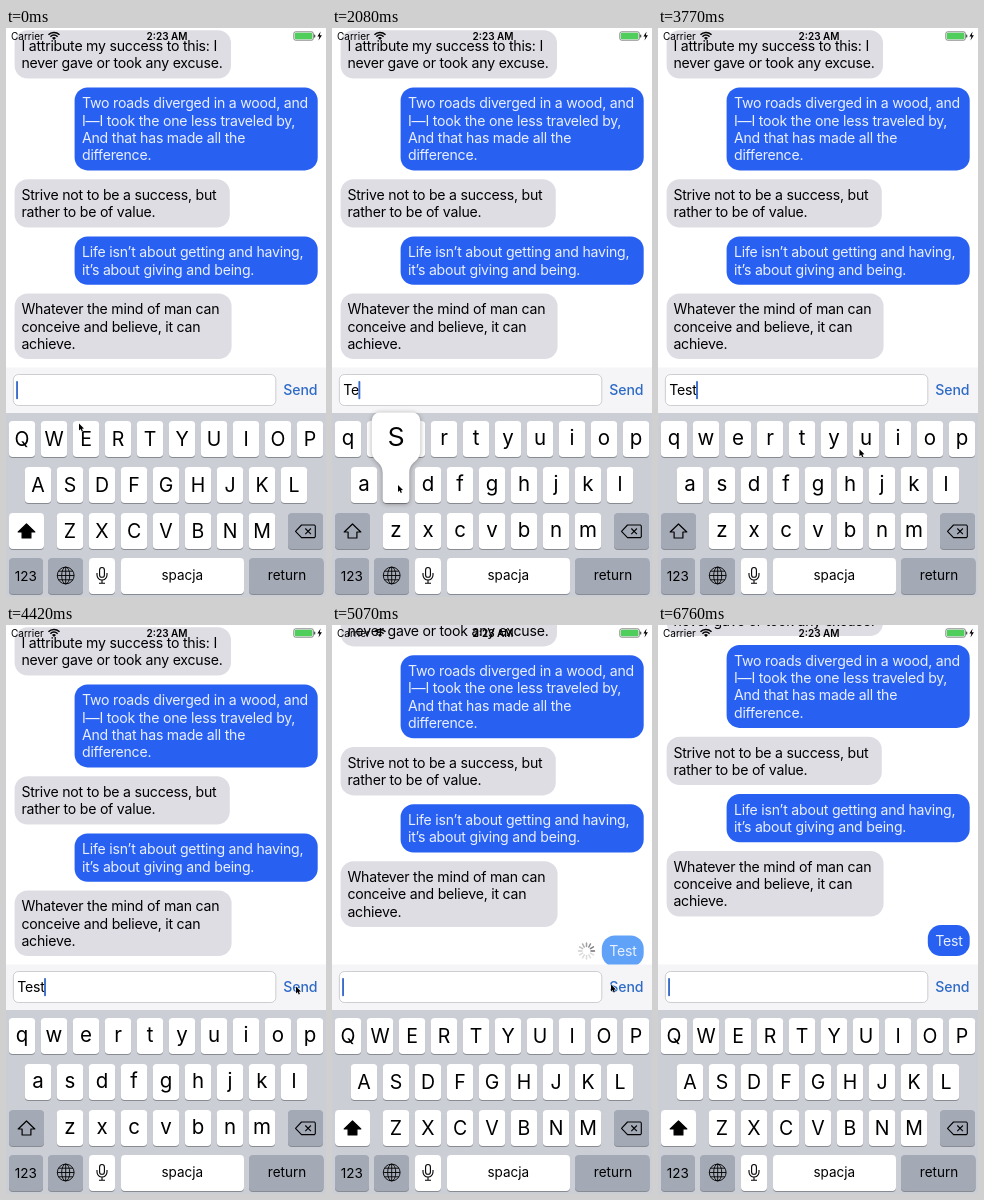
These frames come from a looping animation (320 px wide and 569 px high, 6.89 s). An HTML page with a canvas:

```html
<!DOCTYPE html>
<html lang="en">
<head>
<meta charset="utf-8">
<title>Chat</title>
<style>
html, body { margin: 0; width: 100%; height: 100%; overflow: hidden; background: #fff; }
canvas { display: block; width: 100vw; height: 100vh; }
</style>
</head>
<body>
<canvas id="stage"></canvas>
<script>
const W = 320, H = 569, LOOP = 6890, STEP = 130;
const FONT = 'Inter, "Liberation Sans", Arial, sans-serif';
const GREY = '#dfdde4', BLUE = '#2860f2', PENDING = '#60a2f8', KEY_GREY = '#a3aab6';
const SEND = 4847, SENT = 6630, LIFT = 39.5, LINE = 17.35;

const messages = [
  { y: 2.2, x: 8.6, w: 216.4, lines: ['I attribute my success to this: I', 'never gave or took any excuse.'] },
  { y: 59.4, x: 68.6, w: 243.1, mine: true, lines: ['Two roads diverged in a wood, and', 'I\u2014I took the one less traveled by,', 'And that has made all the', 'difference.'] },
  { y: 151.2, x: 8.6, w: 215.2, lines: ['Strive not to be a success, but', 'rather to be of value.'] },
  { y: 208.4, x: 68.6, w: 243.1, mine: true, lines: ['Life isn\u2019t about getting and having,', 'it\u2019s about giving and being.'] },
  { y: 265.4, x: 8.6, w: 217, lines: ['Whatever the mind of man can', 'conceive and believe, it can', 'achieve.'] }
];

const rows = [
  { keys: 'QWERTYUIOP', x: 16, y: 393 },
  { keys: 'ASDFGHJKL', x: 32, y: 439 },
  { keys: 'ZXCVBNM', x: 64, y: 485 }
];

// Key presses: letter, down time, up time
const presses = [['T', 1040, 1300], ['e', 1690, 1950], ['s', 2080, 2340], ['t', 2470, 2600]];

// Pointer stops: time, x, y
const stops = [
  [0, 73, 395.5], [260, 73, 395.5], [1040, 146, 411.5], [1300, 146, 411.5],
  [1690, 82, 411], [1820, 82, 411], [2080, 66, 457], [2210, 66, 457],
  [2470, 146, 411], [2600, 146, 411], [2860, 144, 459.5], [3250, 144, 460],
  [3380, 144, 460], [4290, 290, 361.5], [4810, 290, 361.5], [5070, 279, 359.5],
  [5590, 328, 580], [LOOP, 328, 580]
];

const canvas = document.getElementById('stage');
const c = canvas.getContext('2d');

const smooth = p => p * p * (3 - 2 * p);
const clamp = p => Math.max(0, Math.min(1, p));
const easeInOut = p => p < 0.5 ? 2 * p * p : 1 - 2 * (1 - p) * (1 - p);

function box(x, y, w, h, r, fill, stroke) {
  c.beginPath();
  c.roundRect(x, y, w, h, r);
  if (fill) { c.fillStyle = fill; c.fill(); }
  if (stroke) { c.strokeStyle = stroke; c.stroke(); }
}

function text(str, x, y, size, color = '#000', { align = 'left', weight = 400, gap = 0 } = {}) {
  c.font = `${weight} ${size}px ${FONT}`;
  c.letterSpacing = gap + 'px';
  c.textAlign = align;
  c.fillStyle = color;
  c.fillText(str, x, y);
}

function path(points, close) {
  c.beginPath();
  points.forEach(([x, y]) => c.lineTo(x, y));
  if (close) c.closePath();
}

function bubble({ x, y, w, lines, mine }, fill) {
  box(x, y, w, 13.6 + lines.length * LINE, 13, fill);
  lines.forEach((line, i) => text(line, x + (mine ? 7.4 : 6.8), y + 20.8 + i * LINE, 14.1, mine ? '#e8efff' : '#000', { gap: -0.22 }));
}

function spinner(x, y, t) {
  const head = Math.floor(t * 12 / 1000);
  c.lineWidth = 1.5;
  c.lineCap = 'round';
  for (let i = 0; i < 12; i++) {
    const a = i * Math.PI / 6;
    const age = ((head - i) % 12 + 12) % 12;
    c.strokeStyle = `rgba(110,110,115,${Math.max(0.25, 1 - age * 0.11)})`;
    path([[x + 4.5 * Math.cos(a), y + 4.5 * Math.sin(a)], [x + 8 * Math.cos(a), y + 8 * Math.sin(a)]]);
    c.stroke();
  }
  c.lineCap = 'butt';
}

function drawChat(t) {
  const lift = LIFT * easeInOut(clamp((t - SEND) / 350));
  c.save();
  c.translate(0, -lift);
  messages.forEach(m => bubble(m, m.mine ? BLUE : GREY));
  if (t >= SEND) {
    bubble({ x: 269.8, y: 339.6, w: 41.9, lines: ['Test'], mine: true }, t < SENT ? PENDING : BLUE);
    if (t < SENT) spinner(254.5, 355, t);
  }
  c.restore();
}

function drawStatus() {
  text('Carrier', 5, 12, 10);
  text('2:23 AM', 161, 12, 10, '#000', { align: 'center', weight: 600 });
  c.strokeStyle = '#000';
  c.lineWidth = 1.5;
  [7.6, 4.9].forEach(r => {
    c.beginPath();
    c.arc(48, 12, r, -Math.PI * 0.76, -Math.PI * 0.24);
    c.stroke();
  });
  c.fillStyle = '#000';
  c.beginPath();
  c.moveTo(48, 12);
  c.arc(48, 12, 2.8, -Math.PI * 0.76, -Math.PI * 0.24);
  c.fill();
  c.lineWidth = 0.7;
  box(287.8, 3.8, 19.6, 8.4, 1.8, null, '#555');
  box(288.8, 4.8, 17.6, 6.4, 1, '#4fce5c');
  box(308, 6.5, 1.3, 3, 0.6, '#555');
  path([[314.6, 3.6], [311.4, 8.6], [313.4, 8.6], [312.5, 12.4], [315.9, 7.2], [313.8, 7.2]], true);
  c.fillStyle = '#000';
  c.fill();
}

function caretOn(t) {
  const start = t < 1300 ? -100 : t < 2600 ? t : t < SEND ? 2400 : 4670;
  return (t - start) % 1000 < 500;
}

function drawInput(t) {
  c.fillStyle = '#f5f5f7';
  c.fillRect(0, 339.5, W, 45.5);
  c.lineWidth = 0.8;
  box(7.4, 346.5, 262.4, 31, 5, '#fff', '#c3c3c8');
  const typed = t < SEND ? presses.filter(p => t >= p[2]).map(p => p[0]).join('') : '';
  text(typed, 11.3, 367, 14.1, '#000', { gap: -0.2 });
  const caretX = typed ? 10.6 + c.measureText(typed).width : 10.1;
  if (caretOn(t)) box(caretX, 353, 1.9, 18.2, 0.8, '#3b6ccc');
  c.globalAlpha = t >= 4680 && t < SEND ? 0.3 : 1;
  text('Send', 277.3, 367, 14.1, '#2f6bc6', { weight: 500, gap: -0.1 });
  c.globalAlpha = 1;
}

function key(x, y, w, fill = '#fff') {
  box(x, y + 1, w, 36, 4, '#888b91');
  box(x, y, w, 36, 4, fill);
}

function drawShift(upper) {
  key(3, 485, 35, upper ? '#fff' : KEY_GREY);
  path([[20.5, 496], [28.8, 504], [24.9, 504], [24.9, 510], [16.1, 510], [16.1, 504], [12.2, 504]], true);
  c.lineWidth = 1.2;
  c.lineJoin = 'round';
  c.strokeStyle = c.fillStyle = '#000';
  if (upper) c.fill();
  c.stroke();
}

function drawBackspace() {
  key(282, 485, 35, KEY_GREY);
  c.lineWidth = 1.1;
  c.strokeStyle = '#000';
  path([[289.5, 503.3], [295.5, 497], [308.5, 497], [309.3, 498], [309.3, 508.7], [308.5, 509.6], [295.5, 509.6]], true);
  c.stroke();
  [-1, 1].forEach(s => {
    path([[299.3, 503.3 - s * 2.8], [304.9, 503.3 + s * 2.8]]);
    c.stroke();
  });
}

function drawGlobe() {
  key(42, 530, 35, KEY_GREY);
  c.lineWidth = 0.9;
  c.strokeStyle = '#000';
  const x = 59.7, y = 547.5, r = 8.4;
  [r, r * 0.48].forEach(rx => {
    c.beginPath();
    c.ellipse(x, y, rx, r, 0, 0, 7);
    c.stroke();
  });
  [[0, r], [-4.3, 7.2], [4.3, 7.2]].forEach(([dy, half]) => {
    path([[x - half, y + dy], [x + half, y + dy]]);
    c.stroke();
  });
  path([[x, y - r], [x, y + r]]);
  c.stroke();
}

function drawMic() {
  key(83, 530, 26, '#fff');
  c.lineWidth = 1.1;
  box(93.6, 539.5, 4.8, 9.8, 2.4, null, '#000');
  c.beginPath();
  c.moveTo(91, 545);
  c.lineTo(91, 547);
  c.arc(96, 547, 5, Math.PI, 0, true);
  c.lineTo(101, 545);
  c.moveTo(96, 552);
  c.lineTo(96, 555);
  c.moveTo(93, 555.2);
  c.lineTo(99, 555.2);
  c.stroke();
}

function drawPopup(letter) {
  const row = rows.find(r => r.keys.includes(letter.toUpperCase()));
  const x = row.x + 32 * row.keys.indexOf(letter.toUpperCase());
  const y = row.y, wide = 24.2, half = 13.3;
  const top = y - 54.5, shoulder = y - 16, neck = y + 6;
  const upper = letter !== letter.toLowerCase();
  c.save();
  c.shadowColor = 'rgba(0,0,0,0.35)';
  c.shadowBlur = 5;
  c.shadowOffsetY = 0.8;
  c.fillStyle = '#fff';
  c.beginPath();
  c.moveTo(x, top);
  c.arcTo(x + wide, top, x + wide, shoulder, 8);
  c.lineTo(x + wide, shoulder);
  c.bezierCurveTo(x + wide, y - 5, x + half, y - 6, x + half, neck);
  c.arcTo(x + half, y + 36, x, y + 36, 4);
  c.arcTo(x - half, y + 36, x - half, neck, 4);
  c.lineTo(x - half, neck);
  c.bezierCurveTo(x - half, y - 6, x - wide, y - 5, x - wide, shoulder);
  c.arcTo(x - wide, top, x, top, 8);
  c.closePath();
  c.fill();
  c.restore();
  text(letter, x, y - (upper ? 19 : 21), upper ? 34 : 35, '#000', { align: 'center', weight: 300 });
}

function drawKeyboard(t) {
  const upper = t < 1300 || t >= SEND;
  const center = { align: 'center' };
  c.fillStyle = '#ccced5';
  c.fillRect(0, 385, W, H - 385);
  rows.forEach(row => [...row.keys].forEach((k, i) => {
    const x = row.x + 32 * i;
    key(x - 13.2, row.y, 26.4);
    text(upper ? k : k.toLowerCase(), x, row.y + (upper ? 25 : 24), upper ? 19.5 : 20.5, '#000', center);
  }));
  drawShift(upper);
  drawBackspace();
  key(3, 530, 34, KEY_GREY);
  text('123', 19.7, 552.5, 13.5, '#000', center);
  drawGlobe();
  drawMic();
  key(115, 530, 123);
  text('spacja', 176.3, 552, 13.5, '#000', center);
  key(243, 530, 74.5, KEY_GREY);
  text('return', 281, 552, 13.5, '#000', center);
  const active = presses.find(p => t >= p[1] && t < p[2]);
  if (active) drawPopup(active[0]);
}

function drawPointer(t) {
  const i = stops.findIndex(s => s[0] > t);
  const [t0, x0, y0] = stops[i - 1], [t1, x1, y1] = stops[i];
  const p = smooth((t - t0) / (t1 - t0));
  c.save();
  c.translate(x0 + (x1 - x0) * p, y0 + (y1 - y0) * p);
  c.scale(0.86, 0.86);
  path([[0, 0], [0, 8.2], [1.9, 6.5], [3.1, 9.3], [4.6, 8.6], [3.4, 6], [5.8, 5.8]], true);
  c.lineJoin = 'round';
  c.lineWidth = 1.2;
  c.strokeStyle = 'rgba(255,255,255,0.85)';
  c.stroke();
  c.fillStyle = '#000';
  c.fill();
  c.restore();
}

function resize() {
  const ratio = window.devicePixelRatio || 1;
  canvas.width = Math.round(innerWidth * ratio);
  canvas.height = Math.round(innerHeight * ratio);
}

function draw(now) {
  const t = Math.floor(now % LOOP / STEP) * STEP;
  c.setTransform(canvas.width / W, 0, 0, canvas.height / H, 0, 0);
  c.fillStyle = '#fff';
  c.fillRect(0, 0, W, H);
  drawChat(t);
  drawStatus();
  drawInput(t);
  drawKeyboard(t);
  drawPointer(t);
}

const begin = performance.now();
function tick() {
  draw(performance.now() - begin);
  requestAnimationFrame(tick);
}
addEventListener('resize', resize);
resize();
tick();
</script>
</body>
</html>
```
